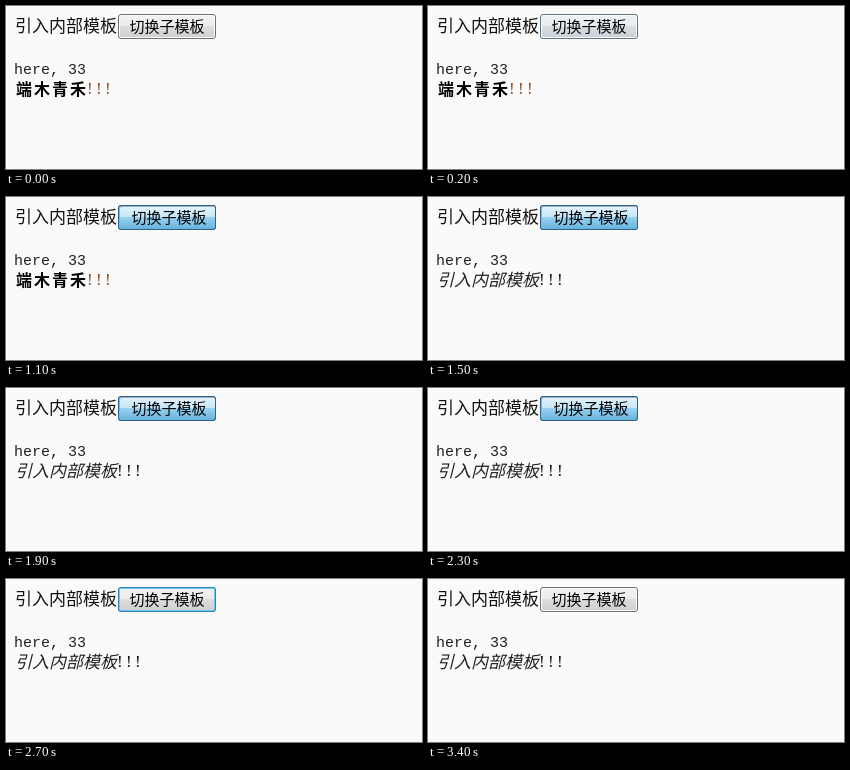
Recreate the animation shown at these times as an HTML page. Size 416 by 163 pixels, loop 3500 ms.

```html
<!DOCTYPE html>
<html lang="zh-CN">
<head>
<meta charset="utf-8">
<title>切换子模板</title>
<style>
  html, body { margin: 0; width: 100%; height: 100%; overflow: hidden; background: #fafafa; }
  svg { position: absolute; left: 0; top: 0; }
  text { font: 300 17px "Noto Sans CJK SC", "Noto Sans CJK", sans-serif; fill: #111; }
  .mono { font: 15px "Liberation Mono", "DejaVu Sans Mono", monospace; fill: #222; }
  .mark { font: 17px "Liberation Serif", "Noto Serif", serif; letter-spacing: 3.34px; }
  .bold .mark { fill: #8a4a20; }
  .strong { font-size: 16px; font-weight: 700; letter-spacing: 2px; fill: #000; }
  .em { font-style: italic; fill: #222; }
  .label { font-size: 15px; font-weight: 400; fill: #000; }

  .face {
    position: absolute; left: 112px; top: 8px; width: 98px; height: 25px;
    box-sizing: border-box; border: 1px solid #707070; border-radius: 3px;
    background: linear-gradient(#f2f2f2, #ebebeb 50%, #dddddd 50%, #cfcfcf);
    box-shadow: inset 0 0 0 1px #fcfcfc;
  }
  .hot {
    border-color: #3c7fb1;
    background: linear-gradient(#eaf6fd, #d9f0fc 50%, #bee6fd 50%, #a7d9f5);
    box-shadow: inset 0 0 0 1px #f4fbfe;
  }
  .focus { border-color: #3c7fb1; box-shadow: inset 0 0 0 1px #5fd0f2; }
  .down {
    border-color: #2c628b;
    background: linear-gradient(#e5f4fc, #c4e5f6 50%, #98d1ef 50%, #68b3db);
    box-shadow: inset 1px 1px 0 #9eb0ba;
  }

  .hot, .focus, .down, .shift, .bold, .italic { animation: 3.5s step-end infinite; }
  .hot { animation-name: hot; }
  .focus { animation-name: focus; }
  .down { animation-name: down; }
  .shift { animation-name: shift; }
  .bold { animation-name: bold; }
  .italic { animation-name: italic; }

  @keyframes hot {
    0% { opacity: 0 }
    5.714% { opacity: .2 }
    17.143% { opacity: .6 }
    20% { opacity: 1 }
    74.286% { opacity: .5 }
    77.143%, 100% { opacity: 0 }
  }
  @keyframes focus {
    0% { opacity: 0 }
    74.286% { opacity: .5 }
    77.143% { opacity: 1 }
    97.143%, 100% { opacity: 0 }
  }
  @keyframes down {
    0% { opacity: 0 }
    31.429% { opacity: 1 }
    34.286% { opacity: 0 }
    42.857% { opacity: 1 }
    48.571% { opacity: 0 }
    51.429% { opacity: 1 }
    68.571% { opacity: .6 }
    71.429%, 100% { opacity: 0 }
  }
  @keyframes shift {
    0% { transform: none }
    31.429% { transform: translateX(2px) }
    34.286% { transform: none }
    42.857% { transform: translateX(2px) }
    48.571% { transform: none }
    51.429% { transform: translateX(2px) }
    68.571%, 100% { transform: none }
  }
  @keyframes bold {
    0% { opacity: 1 }
    34.286% { opacity: 0 }
    48.571% { opacity: 1 }
    54.286% { opacity: 0 }
    60% { opacity: 1 }
    65.714%, 100% { opacity: 0 }
  }
  @keyframes italic {
    0% { opacity: 0 }
    34.286% { opacity: 1 }
    48.571% { opacity: 0 }
    54.286% { opacity: 1 }
    60% { opacity: 0 }
    65.714%, 100% { opacity: 1 }
  }
</style>
</head>
<body>
  <div class="face"></div>
  <div class="face focus"></div>
  <div class="face hot"></div>
  <div class="face down"></div>
  <svg width="416" height="163" viewBox="0 0 416 163">
    <text x="9" y="26">引入内部模板</text>
    <g class="shift"><text class="label" x="123.5" y="25.5">切换子模板</text></g>
    <text class="mono" x="8" y="68">here, 33</text>
    <g class="bold">
      <text class="strong" x="10" y="88.5">端木青禾</text>
      <text class="mark" x="81" y="88">!!!</text>
    </g>
    <g class="italic">
      <text class="em" x="9" y="89">引入内部模板</text>
      <text class="mark" x="111" y="88">!!!</text>
    </g>
  </svg>
</body>
</html>
```
